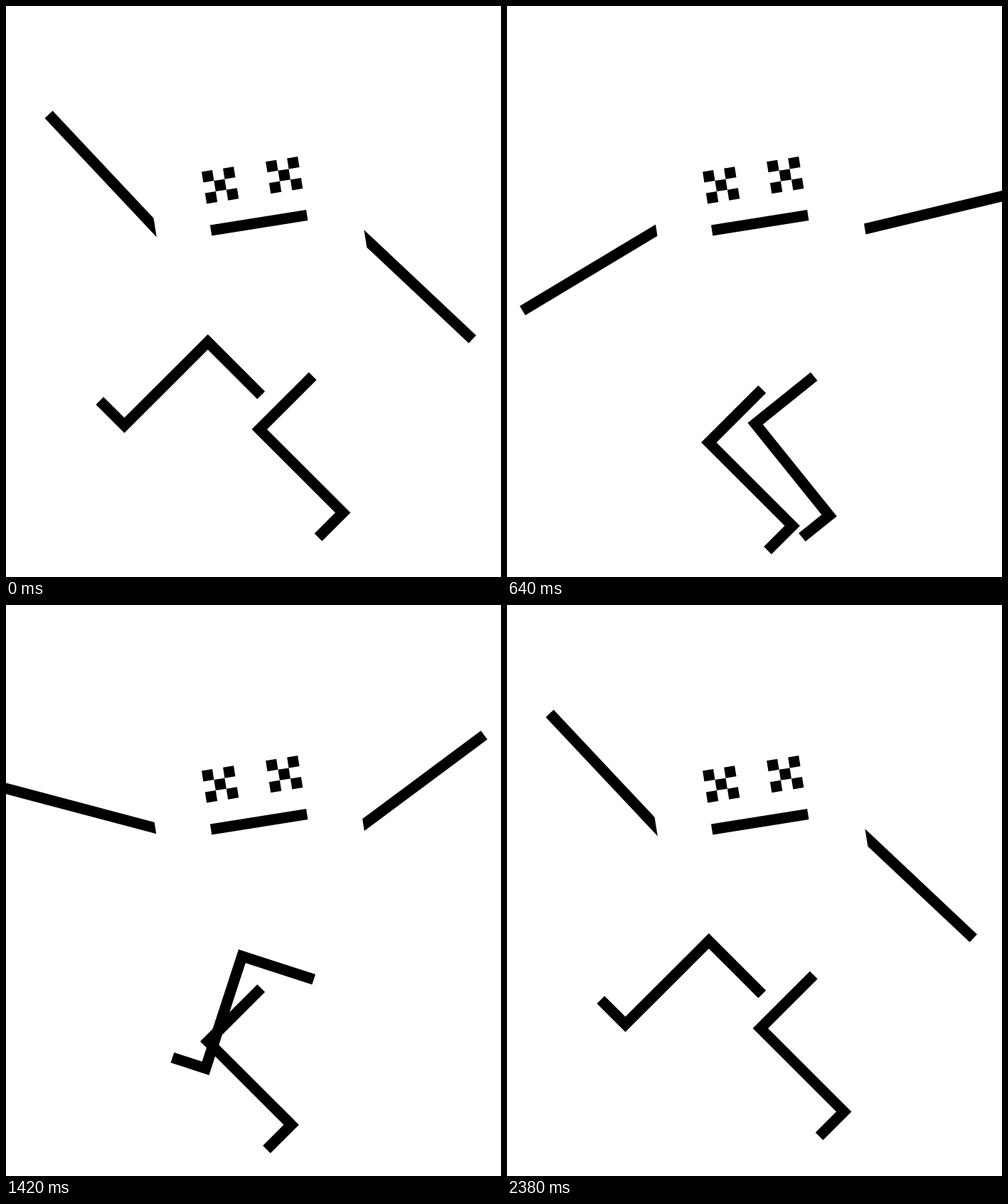
An HTML page for the animation above (2.4 s loop, 696x804 px).

```html
<!DOCTYPE html>
<html lang="en">
<head>
<meta charset="utf-8">
<title>Running figure</title>
<style>
  html, body { margin: 0; width: 100%; height: 100%; overflow: hidden; background: #fff; }
  svg { display: block; width: 100%; height: 100%; }
  .limb { fill: none; stroke: #000; stroke-width: 15.2; }
</style>
</head>
<body>
<svg viewBox="0 0 696 804">
  <defs><path id="leg" d="M6 0H-100V166H-149"/></defs>
  <path id="armL" class="limb" d="M25 0H-222"/>
  <path id="armR" class="limb" d="M-15 0H223"/>
  <g transform="translate(355.7 305.3) rotate(-9)">
    <!-- white torso hides the shoulders -->
    <rect x="-145.3" y="-140" width="289.6" height="300" fill="#fff"/>
    <path id="face"/>
  </g>
  <use id="legL" class="limb" href="#leg"/>
  <use id="legR" class="limb" href="#leg"/>
</svg>
<script>
const LOOP = 2400, STEP = 20, CELL = 15.2;
const $ = id => document.getElementById(id);

// A block of grid cells, centred on column x and row y
const block = (x, y, w = 1) =>
  `M${(x - w / 2) * CELL} ${(y - 0.5) * CELL}h${w * CELL}v${CELL}h${-w * CELL}z`;

// Checkered eyes four rows above a nine-cell mouth
let face = block(0, 0, 9);
for (const eye of [-3, 3])
  for (let i = 0; i < 9; i += 2)
    face += block(eye + i % 3 - 1, Math.floor(i / 3) - 5);
$('face').setAttribute('d', face);

// Linear 0 to 1 between times a and b
const ramp = (t, a, b) => Math.min(1, Math.max(0, (t - a) / (b - a)));

// Back-and-forth swing: 0 to 1, then back, turning at each given time
const swing = (t, ...turns) => turns.slice(1).reduce(
  (sum, end, i) => sum + (i % 2 ? -1 : 1) * ramp(t, turns[i], end), 0);

function pose(id, x, y, angle) {
  $(id).setAttribute('transform', `translate(${x} ${y}) rotate(${angle})`);
}

function draw(t) {
  pose('armL', 212, 314.6, 46.8 - 90 * swing(t, 0, 740, 1200, 1820, 2380));
  pose('armR', 493.5, 316.4, 43.3 - 80 * (swing(t, 0, 518, 939, 1405) - ramp(t, 1562, 2180)));
  pose('legL', 354.5, 543.8, 45 - 90 * (ramp(t, 0, 387) - ramp(t, 1620, 2280)));
  pose('legR', 427, 525.4, 90 * swing(t, 600, 1180, 1980) - 45);
}

const start = performance.now();
function tick() {
  const t = (performance.now() - start) % LOOP;
  draw(Math.floor(t / STEP) * STEP);
  requestAnimationFrame(tick);
}
draw(0);
requestAnimationFrame(tick);
</script>
</body>
</html>
```
